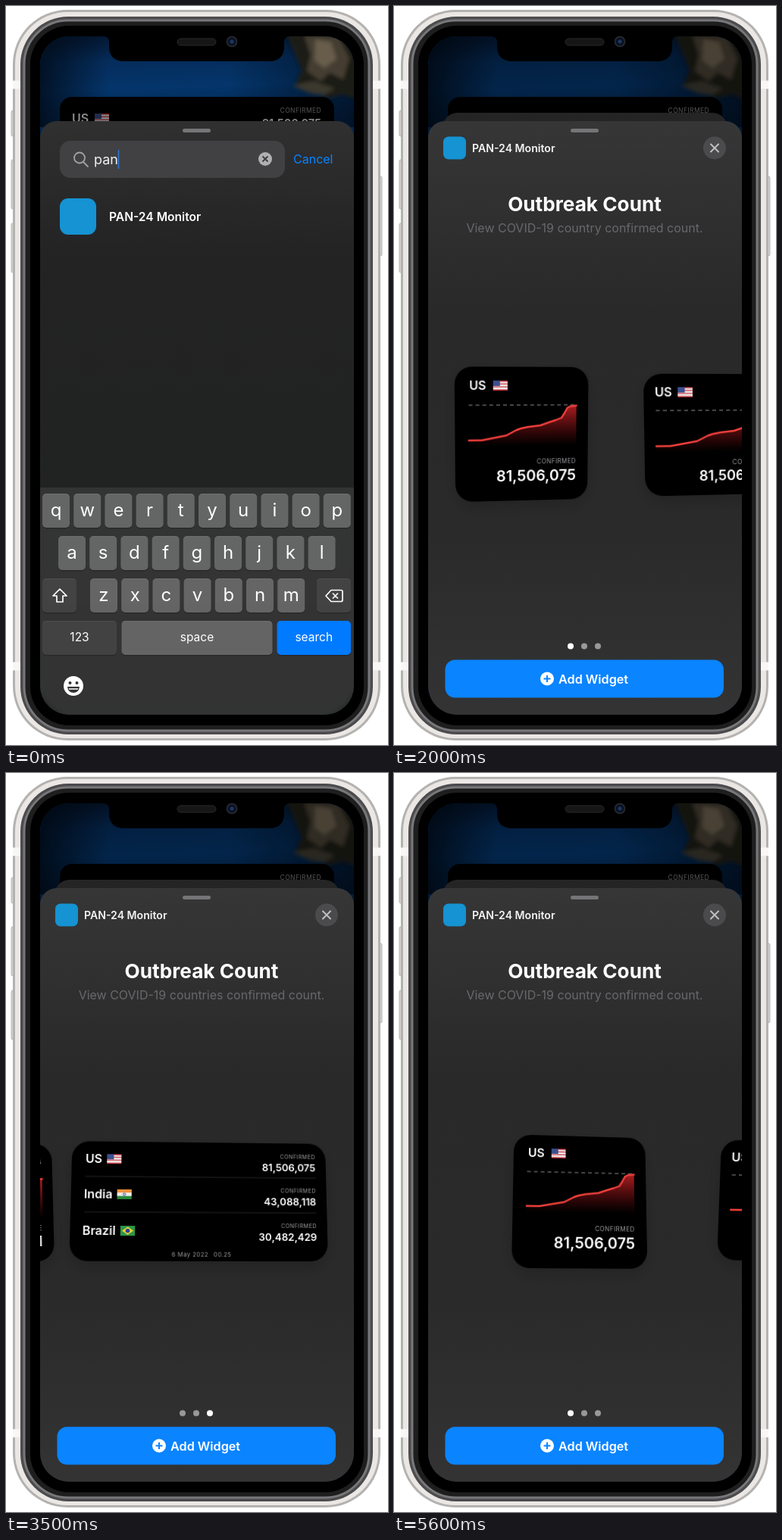
These frames come from a looping animation (504 by 976 pixels, 5.7 s). An HTML page:

```html
<!DOCTYPE html>
<html lang="en">
<head>
<meta charset="utf-8">
<title>Widget gallery</title>
<style>
html, body { margin: 0; width: 100%; height: 100%; overflow: hidden; background: #fff; }
#stage { position: relative; width: 504px; height: 976px; overflow: hidden; font-family: Inter, sans-serif; }
svg { position: absolute; left: 0; top: 0; display: block; }
text { white-space: pre; }
#screen { position: absolute; left: 45px; top: 40px; width: 414px; height: 896px; border-radius: 38px; overflow: hidden; background: #03284f; }
#detail { position: absolute; left: 0; top: 0; width: 414px; height: 896px; }
#keyboard { top: 596px; background: rgba(70,70,71,.5); backdrop-filter: blur(4px); }
.card { position: absolute; left: 0; top: 0; border-radius: 23px; background: #000; overflow: hidden; box-shadow: 0 8px 22px rgba(0,0,0,.18); }
.end { text-anchor: end; }
.mid { text-anchor: middle; }
.bold { font-weight: 600; }
.title { text-anchor: middle; font-weight: 700; }
.tiny { letter-spacing: .4px; }
</style>
</head>
<body>
<div id="stage">
  <svg width="504" height="976">
    <defs>
      <linearGradient id="sea" x2=".12" y2="1"><stop stop-color="#04162f"/><stop offset=".3" stop-color="#052d5c"/><stop offset=".6" stop-color="#04356b"/><stop offset="1" stop-color="#03244b"/></linearGradient>
      <linearGradient id="shade"><stop stop-color="#010812" stop-opacity=".75"/><stop offset=".22" stop-color="#010812" stop-opacity="0"/><stop offset=".6" stop-color="#010812" stop-opacity="0"/><stop offset="1" stop-color="#010812" stop-opacity=".6"/></linearGradient>
      <linearGradient id="searchFill" x2="0" y2="1"><stop stop-color="#303031"/><stop offset=".2" stop-color="#232324"/><stop offset="1" stop-color="#1f2120"/></linearGradient>
      <linearGradient id="detailFill" x2="0" y2="1"><stop stop-color="#363637"/><stop offset=".3" stop-color="#2a292a"/><stop offset=".65" stop-color="#2a2a2b"/><stop offset="1" stop-color="#353536"/></linearGradient>
      <linearGradient id="glow" x2="0" y2="1"><stop stop-color="#d5262a" stop-opacity=".8"/><stop offset="1" stop-color="#a01015" stop-opacity="0"/></linearGradient>
      <filter id="soft"><feGaussianBlur stdDeviation="2.5"/></filter>
      <g id="us"><path fill="#eee" d="M0 0h19v13H0z"/><path stroke="#c8323c" stroke-width="1.4" d="M0 .7h19M0 4.4h19M0 8.1h19M0 12.2h19"/><path fill="#3b4f8f" d="M0 0h9v7H0z"/></g>
      <g id="india"><path fill="#eee" d="M0 0h19v13H0z"/><path fill="#f0923a" d="M0 0h19v4.3H0z"/><path fill="#2a8a3c" d="M0 8.7h19V13H0z"/><circle cx="9.5" cy="6.5" r="1.6" fill="none" stroke="#27408b"/></g>
      <g id="brazil"><path fill="#2a9748" d="M0 0h19v13H0z"/><path fill="#f2cf35" d="M9.5 1.3 17 6.5 9.5 11.7 2 6.5z"/><circle cx="9.5" cy="6.5" r="2.8" fill="#28448f"/></g>
    </defs>
    <g fill="#d6d4d1" stroke="#a09e9c" stroke-width=".7">
      <rect x="7" y="138" width="6" height="34" rx="2"/><rect x="7" y="203" width="6" height="65" rx="2"/>
      <rect x="7" y="287" width="6" height="65" rx="2"/><rect x="490" y="225" width="6" height="105" rx="2"/>
    </g>
    <rect x="9" y="5" width="485" height="965" rx="72" fill="#b4b2b0"/>
    <rect x="12" y="8" width="479" height="959" rx="69" fill="#eae7e4"/>
    <path stroke="#f8f7f6" stroke-width="11" d="M9 104h11m463 0h11M9 872h11m463 0h11"/>
    <rect x="19" y="14" width="465" height="948" rx="63" fill="#4c4b4d"/>
    <rect x="24" y="19" width="455" height="938" rx="58" fill="#1e1e1f" stroke="#78777a" stroke-width="3"/>
    <rect x="32" y="26" width="440" height="924" rx="51"/>
  </svg>

  <div id="screen">
    <svg width="414" height="896" viewBox="45 40 414 896">
      <path fill="url(#sea)" d="M45 40h414v120H45z"/>
      <path fill="url(#shade)" d="M45 40h414v120H45z"/>
      <g filter="url(#soft)">
        <path fill="#1c1a15" d="M367 30h102v95l-25-8-20 5-16-12-26-6 8-19-9-22z"/>
        <path fill="#443d31" d="m394 40 45 1 14 28-8 28-18-9-12 11-18-13 5-22z"/>
        <path fill="#685d4b" d="m408 44 21 4 7 22-16 12-13-10z"/>
        <path fill="#3b382f" d="m378 105 28-6 28 10-15 9-18-3z"/>
      </g>
      <path id="homeDim" d="M45 40h414v200H45z"/>
      <rect x="71" y="120" width="362" height="150" rx="16"/>
      <text x="87" y="154" font-size="16" class="bold" fill="#8a8a8a">US</text>
      <use href="#us" x="117" y="142" opacity=".55"/>
      <text x="416" y="141" font-size="8.5" class="end tiny" fill="#565658">CONFIRMED</text>
      <text x="416" y="160" font-size="14.6" class="end bold" fill="#8a8a8a">81,506,075</text>
      <g id="search">
        <rect x="45" y="152" width="414" height="900" rx="22" fill="url(#searchFill)"/>
        <rect id="handle" x="233" y="162" width="37" height="5" rx="2.5" fill="#757577"/>
        <rect x="71" y="178" width="297" height="49" rx="14" fill="#414143"/>
        <g fill="none" stroke="#a2a2a5" stroke-width="1.8" stroke-linecap="round"><circle cx="97" cy="200.5" r="7"/><path d="m102 206 6 6"/></g>
        <text x="116" y="209" font-size="18" fill="#f0f0f0">pan</text>
        <path id="cursor" stroke="#2f7be0" stroke-width="1.4" d="M148.500 190v25"/>
        <circle cx="342" cy="202" r="9" fill="#b0b0b3"/>
        <path stroke="#3c3c3e" stroke-width="1.8" d="m338.500 198.500 7 7m0-7-7 7"/>
        <text x="379" y="207.500" font-size="16" fill="#0a84ff">Cancel</text>
        <rect x="71" y="254" width="48" height="48" rx="11" fill="#1593d2"/>
        <text x="136" y="284" font-size="15.6" class="bold" fill="#fff">PAN-24 Monitor</text>
        <rect id="searchDim" x="45" y="152" width="414" height="900" rx="22"/>
      </g>
    </svg>

    <div id="detail">
      <svg width="414" height="896" viewBox="45 40 414 896">
        <rect x="45" y="152" width="414" height="830" rx="22" fill="url(#detailFill)"/>
        <rect x="233" y="162" width="37" height="5" rx="2.5" fill="#757577"/>
        <rect x="65" y="172.5" width="30" height="30" rx="7" fill="#1593d2"/>
        <text x="103" y="193" font-size="14.1" class="bold" fill="#f4f4f4">PAN-24 Monitor</text>
        <circle cx="423" cy="187.5" r="15" fill="#4b4b4d"/>
        <path stroke="#c0c0c3" stroke-width="2" stroke-linecap="round" d="m418 182.500 10 10m0-10-10 10"/>
        <g id="titles"></g>
        <g id="dots"><circle cx="233" cy="845.5" r="4"/><circle cx="251" cy="845.5" r="4"/><circle cx="269" cy="845.5" r="4"/></g>
        <rect x="67.5" y="863.5" width="367.5" height="50" rx="13" fill="#0a84ff"/>
        <circle cx="202" cy="888.5" r="9" fill="#fff"/>
        <path stroke="#0a84ff" stroke-width="2" d="M197.500 888.500h9m-4.500-4.500v9"/>
        <text x="217" y="894.5" font-size="16.2" class="bold" fill="#fff">Add Widget</text>
      </svg>
      <div id="cards"></div>
    </div>
    <svg id="keyboard" width="414" height="300" viewBox="45 636 414 300"></svg>
  </div>

  <svg width="504" height="976">
    <path d="M128 38v2q8 0 8 8v5q0 20 20 20h191q20 0 20-20v-5q0-8 8-8v-2z"/>
    <rect x="226" y="43" width="51" height="9" rx="4.5" fill="#161617" stroke="#28282a"/>
    <circle cx="298" cy="47" r="6.5" fill="#0b1222" stroke="#2a2d35" stroke-width="1.5"/>
    <circle cx="298" cy="47" r="2.5" fill="#1d3763"/>
  </svg>
</div>

<script>
const $ = id => document.getElementById(id);
const text = (x, y, size, str, cls = '', fill = '#fff') =>
  `<text x="${x}" y="${y}" font-size="${size}" class="${cls}" fill="${fill}">${str}</text>`;
const bar = (x, y, w, h) => `<rect x="${x}" y="${y}" width="${w}" height="${h}" rx="1" fill="#2c2c2e"/>`;
const GREY = '#98989c', DATE = '6 May 2022\u2002 00.25';

// Keyboard
const key = (x, y, w, label, size = 24, fill = 'rgba(255,255,255,.285)') =>
  `<rect x="${x}" y="${y + 1.2}" width="${w}" height="45" rx="5" fill="#000" opacity=".25"/>
   <rect x="${x}" y="${y}" width="${w}" height="45" rx="5" fill="${fill}"/>` +
  text(x + w / 2, y + 22 + size / 3, size, label, 'mid');
const keyRow = (letters, x, y) => [...letters].map((c, i) => key(x + i * 41.2, y, 36, c)).join('');
const dark = 'rgba(255,255,255,.13)';
$('keyboard').innerHTML =
  keyRow('qwertyuiop', 48, 644) + keyRow('asdfghjkl', 69, 700) + keyRow('zxcvbnm', 111, 756) +
  key(48, 756, 45, '', 16, dark) + key(410, 756, 45, '', 16, dark) +
  key(48, 812, 98, '123', 15.5, dark) + key(152.5, 812, 199, 'space', 15.5) + key(357.5, 812, 97.5, 'search', 15.5, '#007aff') +
  `<g fill="none" stroke="#fff" stroke-width="1.7" stroke-linejoin="round">
     <path d="m71 770 9 9h-5v8h-8v-8h-5z"/>
     <path d="m422 779 7-7.500h13q2 0 2 2v11q0 2-2 2h-13zm9-3.500 7 7m0-7-7 7"/></g>
   <circle cx="89" cy="898" r="13" fill="#fff"/>
   <g fill="#333"><circle cx="84.5" cy="894" r="2"/><circle cx="93.5" cy="894" r="2"/><path d="M81 899h16q-1 8-8 8t-8-8"/></g>
   <path stroke="#fff" stroke-width="1.5" d="M83 902h12"/>`;

// Widgets
const dashes = (x, y, w) =>
  `<path stroke="#5e5e61" stroke-width="1.4" stroke-dasharray="5 4" d="M${x} ${y}h${w}"/>`;
const line = (pts, floor) => {
  const d = 'M' + pts.map(p => p.join(' ')).join('L');
  return `<path fill="url(#glow)" d="${d}V${floor}H${pts[0][0]}z"/>
    <path fill="none" stroke="#f0403c" stroke-width="2.4" stroke-linecap="round" stroke-linejoin="round" d="${d}"/>`;
};
const rise = [[72,30], [82,28], [100,26], [112,22], [122,19], [130,16], [134,10], [138,3], [142,1], [151,0]];
const trend = [[0,45], [18,45], [35,42], [52,39], [60,35], [66,32], ...rise];
const stepTrend = [[0,44], [18,44], [35,41], [52,39], [59,37], [61,33], ...rise];
const chart = (x, y, w, pts = trend) =>
  dashes(x, y, w) + line(pts.map(([a, b]) => [x + a * w / 151, y + b + 1]), y + 54);
const stat = (x, y, label, value, size, gap) =>
  text(x, y, size > 15 ? 8.3 : 7.4, label, 'end tiny', GREY) + text(x, y + gap, size, value, 'end bold');
const place = (x, y, name, flag, flagX) =>
  text(x, y, 15.8, name, 'bold') + `<use href="#${flag}" x="${flagX}" y="${y - 12}"/>`;
const divider = y => `<path stroke="#242426" d="M18 ${y}h306"/>`;

const sketch = w =>
  bar(17, 21, 92, 13) + dashes(17, 54, w - 34) + line([[18, 103], [w - 17, 54]], 116) +
  bar(w - 60, 122, 42, 7) + bar(w - 103, 138, 84, 14);
const small = place(19, 30, 'US', 'us', 50) + chart(18, 50, 143) + stat(161, 128, 'CONFIRMED', '81,506,075', 20, 23);
const medium = place(14, 29, 'US', 'us', 43) + text(324, 28, 8, DATE, 'end tiny', GREY) +
  chart(15, 47, 151) + chart(180, 47, 144, stepTrend) +
  stat(166, 118, 'CONFIRMED', '81,506,075', 18, 21) + stat(323, 117, 'ACTIVE', '80,511,331', 18, 21);
const list = place(18, 29, 'US', 'us', 46) + divider(47) + place(17, 76, 'India', 'india', 60) + divider(94) +
  place(16, 124, 'Brazil', 'brazil', 65) +
  ['81,506,075', '43,088,118', '30,482,429'].map((n, i) => stat(324, 21 + i * 46.5, 'CONFIRMED', n, 13.5, 17)).join('') +
  text(171, 152, 7.8, DATE, 'mid tiny', GREY);

const cards = [[177, 177, small], [338, 158, medium], [338, 158, list]].map(([w, h, art]) => {
  const el = document.createElement('div');
  el.className = 'card';
  el.style.cssText = `width:${w}px;height:${h}px`;
  el.innerHTML = `<svg width="${w}" height="${h}"><g>${sketch(w)}</g><g>${art}</g></svg>`;
  $('cards').append(el);
  const [rough, full] = el.querySelectorAll('svg > g');
  return { el, w, h, rough, full };
});
$('titles').innerHTML = ['country', 'countries'].map(word =>
  `<g>${text(251.5, 271, 26.2, 'Outbreak Count', 'title')}
      ${text(251.5, 299, 16, `View COVID-19 ${word} confirmed count.`, 'mid', '#68686b')}</g>`).join('');

// Motion
const spring = (t, start, rate) => {
  const x = Math.max(0, t - start) * rate / 1000;
  return 1 - (1 + x) * Math.exp(-x);
};
const track = (t, keys) => {
  const i = Math.max(1, keys.findIndex(k => k[0] >= t));
  const [[t0, a], [t1, b]] = [keys[i - 1], keys[i]];
  const u = (t - t0) / (t1 - t0);
  return a + (b - a) * u * u * (3 - 2 * u);
};
const tiltX = [[0, -2], [400, -3], [1100, -6], [2400, -4], [3500, 7], [4900, 4], [5700, 10]];
const tiltY = [[0, 7], [400, 8], [1100, 10], [2400, 7], [3500, 3], [4900, 7], [5700, 6]];

function draw(t) {
  const up = spring(t, 50, 12.55);
  $('detail').style.transform = `translateY(${784 * (1 - up)}px)`;
  $('keyboard').style.transform = `translateY(${308 * up}px)`;
  $('search').setAttribute('transform',
    `translate(251.5 ${152 - 11 * up}) scale(${1 - .093 * up}) translate(-251.5 -152)`);
  $('handle').setAttribute('opacity', 1 - up);
  $('homeDim').setAttribute('opacity', .3 * up);
  $('searchDim').setAttribute('opacity', .24 * up);
  $('cursor').setAttribute('opacity', t ? 0 : 1);

  const swipe = start => spring(t, start, 9.5);
  const page = swipe(1885) + swipe(2815) - swipe(4415) - swipe(5000);
  const first = Math.min(page, 1), second = Math.max(page - 1, 0);
  const centers = [252 - 277 * first, 609 - 357 * first, 970 - 357 * first].map(x => x - 361 * second);
  const real = Math.min(1, Math.max(0, (t - 1400) / 200));
  cards.forEach(({ el, w, h, rough, full }, i) => {
    el.style.transform = `translate(${centers[i] - 45 - w / 2}px,${525.5 - h / 2}px) perspective(800px) ` +
      `rotateX(${track(t, tiltX)}deg) rotateY(${track(t, tiltY)}deg)`;
    rough.setAttribute('opacity', 1 - real);
    full.setAttribute('opacity', real);
  });
  const [one, two] = $('titles').children;
  one.setAttribute('transform', `translate(${-580 * second} 0)`);
  two.setAttribute('transform', `translate(${580 * (1 - second)} 0)`);
  [...$('dots').children].forEach((dot, i) => dot.setAttribute('fill', i === Math.round(page) ? '#fff' : '#98989b'));
}

const begin = performance.now();
function loop() {
  const t = (performance.now() - begin) % 5700;
  draw(Math.floor(t / 100) * 100);
  requestAnimationFrame(loop);
}
loop();
</script>
</body>
</html>
```
